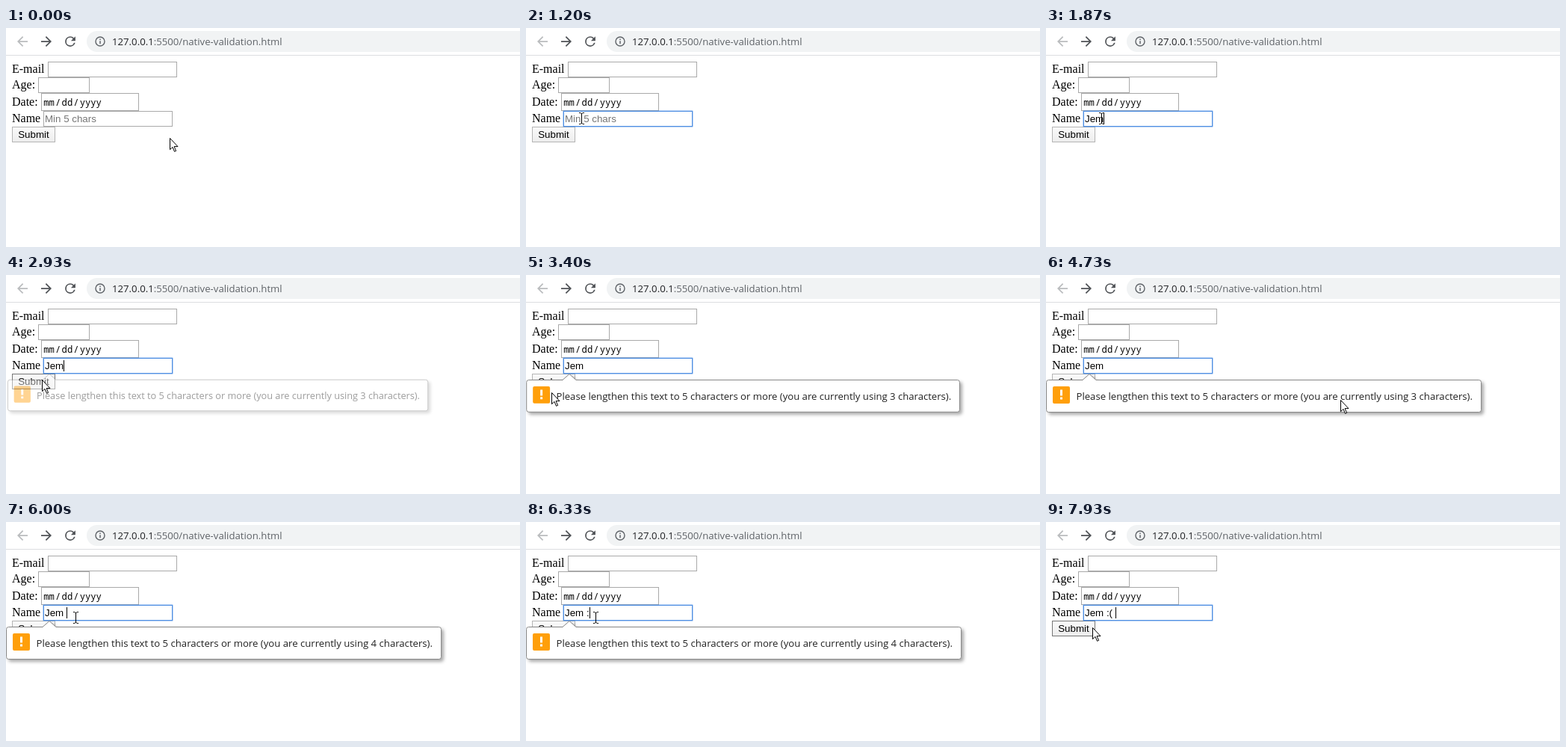
These frames come from a looping animation (688 px wide and 293 px high, 8 s). An HTML page:

```html
<!DOCTYPE html>
<html lang="en">
<head>
<meta charset="utf-8">
<title>Native validation</title>
<style>
  html, body { margin: 0; width: 100%; height: 100%; overflow: hidden; background: #fff; }
  svg { display: block; width: 688px; height: 293px; }
  text { white-space: pre; }
  .ui { font: 13.18px "Open Sans", "Noto Sans", sans-serif; }
  .label { font: 16px "Liberation Serif", serif; }
  .field { font: 13.333px "Liberation Sans", sans-serif; }
  .mono { font: 12.2px "Noto Sans Mono", monospace; }
  .box { fill: #fff; stroke: #a9a9a9; }
  #ring { fill: none; stroke: #4f8fe3; }
  #bubble { filter: drop-shadow(3px 3px 2px rgba(0, 0, 0, .33)); }
</style>
</head>
<body>
<svg viewBox="0 0 688 293">
  <defs>
    <linearGradient id="face" x2="0" y2="1">
      <stop stop-color="#fafafa"/><stop offset="1" stop-color="#ededed"/>
    </linearGradient>
    <path id="arrow" d="M20 11H7.83l5.59-5.59L12 4l-8 8 8 8 1.41-1.41L7.83 13H20z"/>
  </defs>

  <!-- toolbar -->
  <use href="#arrow" transform="translate(11.5 7.5) scale(.875)" fill="#babcbe"/>
  <use href="#arrow" transform="translate(64.5 7.5) scale(-.875 .875)" fill="#505357"/>
  <path transform="translate(75.7 7.7) scale(.86)" fill="#505357"
    d="M17.65 6.35A7.96 7.96 0 0 0 12 4a8 8 0 1 0 7.73 10h-2.08A6 6 0 1 1 12 6c1.66 0 3.14.69 4.22 1.78L13 11h7V4z"/>
  <rect x="108" y="4" width="620" height="28" rx="14" fill="#f1f3f4"/>
  <circle cx="126" cy="18" r="6" fill="none" stroke="#5f6368" stroke-width="1.4"/>
  <path d="M126 17.2v4M126 14.5v1.5" stroke="#5f6368" stroke-width="1.5"/>
  <text class="ui" x="142" y="23" fill="#5f6368"><tspan fill="#202124">127.0.0.1</tspan>:5500/native-validation.html</text>
  <path d="M0 36.5H688" stroke="#dcdee0"/>

  <!-- form -->
  <g class="label">
    <text x="8" y="60">E-mail</text>
    <text x="8" y="81">Age:</text>
    <text x="8" y="104">Date:</text>
    <text x="8" y="126">Name</text>
  </g>
  <g class="box">
    <rect x="56.5" y="45.5" width="172" height="20"/>
    <rect x="43.5" y="66.5" width="68" height="20"/>
    <rect x="47.5" y="87.5" width="130" height="23"/>
    <rect x="50.5" y="111.5" width="172" height="20"/>
  </g>
  <g class="mono">
    <text x="50.3" y="104">mm</text><text x="66" y="104">/</text>
    <text x="74.6" y="104">dd</text><text x="90.2" y="104">/</text>
    <text x="98.7" y="104">yyyy</text>
  </g>
  <rect id="button" x="8.5" y="132.5" width="57" height="20" fill="url(#face)"/>
  <text class="field" x="16.2" y="147">Submit</text>
  <g id="ring">
    <rect x="49.5" y="110.5" width="174" height="22" rx="1" opacity=".4"/>
    <rect x="50.5" y="111.5" width="172" height="20"/>
  </g>
  <text id="value" class="field" x="52" y="126"></text>
  <rect id="caret" y="114" width="1" height="15"/>

  <!-- validation bubble -->
  <g id="bubble">
    <path fill="#fff" stroke="#878787"
      d="M3.5 140.5H49l9-8 9 8H579.5a3 3 0 0 1 3 3V180.5a3 3 0 0 1-3 3H3.5a3 3 0 0 1-3-3V143.5a3 3 0 0 1 3-3z"/>
    <rect x="9" y="149" width="23" height="23" rx="2" fill="#ff9f0a"/>
    <path d="M20.5 153.5v8M20.5 163.5v3" stroke="#fff" stroke-width="3"/>
    <text id="message" class="ui" x="40.5" y="167" fill="#222"></text>
  </g>

  <!-- pointer -->
  <g id="pointer">
    <path id="hand" fill="#fff" stroke="#000"
      d="M.5 .5V15.7l3.5-3.3 2.5 5.9 2.1-.9-2.5-5.8h4.9z"/>
    <path id="beam" fill="none" stroke="#000"
      d="M-3-7.5H-1.5L.5-6.5l2-1H4M.5-6.5v13M-3 7.5H-1.5L.5 6.5l2 1H4"/>
  </g>
</svg>
<script>
const $ = id => document.getElementById(id);
const LOOP = 8000, FPS = 15;

// pointer stops: tick, x, y
const path = [
  [0, 219, 147], [6, 58, 146], [9, 74, 121], [33, 74, 121], [37, 48, 140],
  [46, 48, 140], [51, 34, 157], [59, 300, 164], [62, 300, 164], [66, 394, 167],
  [70, 394, 167], [71, 317, 154], [74, 87, 136], [75, 87, 136], [77, 93, 128],
  [116, 93, 128], [119, 47, 147], [120, 47, 147]
];

// typed text: tick, value, caret x
const typing = [
  [0, '', 52], [22, 'J', 59], [23, 'Je', 66], [25, 'Jem', 77], [90, 'Jem ', 81],
  [94, 'Jem :', 85], [97, 'Jem :(', 89], [113, 'Jem :( ', 93]
];

// ticks at which the caret turns on and off
const blinks = [[10, 18], [22, 34], [42, 50], [58, 66], [74, 82], [90, 106], [113, 120]];

const clamp = v => v < 0 ? 0 : v > 1 ? 1 : v;
const show = (id, on) => $(id).style.display = on ? '' : 'none';
const inside = (p, x, y, w, h) => p[0] >= x && p[0] < x + w && p[1] >= y && p[1] < y + h;

function pointerAt(t) {
  const i = path.findIndex(k => k[0] > t);
  const [a, b] = [path[i - 1], path[i]];
  const u = (t - a[0]) / (b[0] - a[0]);
  return [1, 2].map(n => Math.round(a[n] + (b[n] - a[n]) * u));
}

function drawField(t) {
  const [, text, caretX] = typing.filter(k => k[0] <= t).pop();
  $('value').textContent = text || 'Min 5 chars';
  $('value').setAttribute('fill', text ? '#000' : '#757575');
  $('caret').setAttribute('x', caretX);
  show('caret', blinks.some(([on, off]) => t >= on && t < off));
  show('ring', t >= 10);
}

function drawBubble(t) {
  const opacity = clamp((t - 39.7) / 7.5) * clamp((98 - t) / 3);
  const scale = 1 - .026 * Math.exp((44 - t) / 3.75);
  show('bubble', opacity > 0);
  $('bubble').setAttribute('opacity', opacity);
  $('bubble').setAttribute('transform', `translate(58 132) scale(${scale}) translate(-58 -132)`);
  $('message').textContent = 'Please lengthen this text to 5 characters or more ' +
    `(you are currently using ${t < 90 ? 3 : 4} characters).`;
}

function drawPointer(t) {
  const p = pointerAt(t);
  const overField = inside(p, 50, 111, 173, 21);
  $('pointer').setAttribute('transform', `translate(${p})`);
  show('beam', overField);
  show('hand', !overField);
  $('button').setAttribute('stroke', inside(p, 8, 132, 58, 21) ? '#767676' : '#b4b4b4');
}

const start = performance.now();
function frame() {
  const t = Math.floor((performance.now() - start) % LOOP * FPS / 1000);
  drawField(t);
  drawBubble(t);
  drawPointer(t);
  requestAnimationFrame(frame);
}
frame();
</script>
</body>
</html>
```
